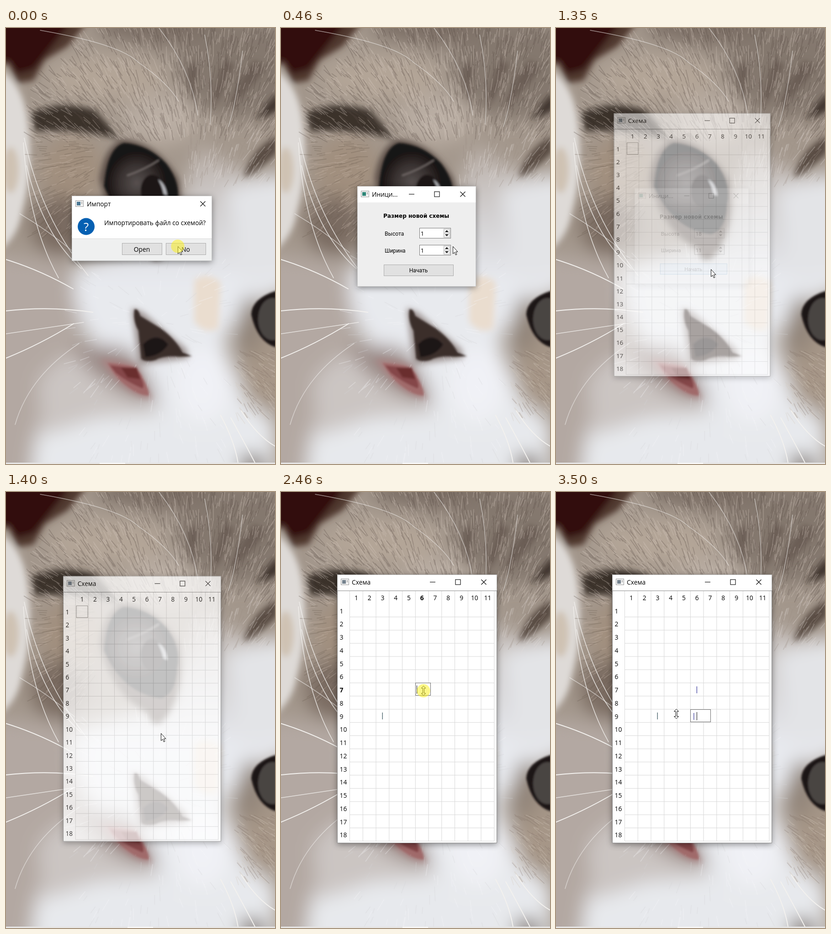
An HTML page for the animation above (3650 ms loop, 589 by 951 pixels).

```html
<!DOCTYPE html>
<html lang="ru">
<head>
<meta charset="utf-8">
<title>Схема</title>
<style>
html, body { margin: 0; width: 100%; height: 100%; overflow: hidden; background: #a79b91; }
svg { position: absolute; left: 0; top: 0; width: 589px; height: 951px; }
#photo { will-change: transform; }
text { font: 13.8px "Open Sans", "Noto Sans", sans-serif; fill: #000; white-space: pre; }
.small { font: 12.1px "Roboto", "Noto Sans", sans-serif; }
.head { font: bold 12.1px "DejaVu Sans", sans-serif; }
.mid { text-anchor: middle; }
.bar { font-size: 15px; text-anchor: middle; }
.btn { fill: #e1e1e1; stroke: #adadad; }
.line { fill: none; stroke: #111; stroke-width: 1.15; }
.shade { filter: drop-shadow(0 3px 7px rgba(0, 0, 0, .42)); }
</style>
</head>
<body>
<svg id="photo" viewBox="0 0 589 951">
  <defs>
    <filter id="b20" x="-40%" y="-40%" width="180%" height="180%"><feGaussianBlur stdDeviation="20"/></filter>
    <filter id="b7" x="-40%" y="-40%" width="180%" height="180%"><feGaussianBlur stdDeviation="7"/></filter>
    <filter id="b2" x="-30%" y="-30%" width="160%" height="160%"><feGaussianBlur stdDeviation="2"/></filter>
    <filter id="b05" x="0" y="0" width="100%" height="100%"><feGaussianBlur stdDeviation=".6"/></filter>
    <radialGradient id="iris"><stop offset="0" stop-color="#57504f"/><stop offset=".6" stop-color="#37302f"/><stop offset="1" stop-color="#1b1514"/></radialGradient>
    <linearGradient id="muzzle" x2="0" y2="1"><stop offset="0" stop-color="#b9aea6"/><stop offset=".22" stop-color="#d3d1d2"/><stop offset=".4" stop-color="#e8eaef"/><stop offset="1" stop-color="#e7e9ec"/></linearGradient>
  </defs>
  <rect width="589" height="951" fill="#a3978c"/>
  <g filter="url(#b20)">
    <ellipse cx="220" cy="110" rx="130" ry="50" fill="#b3a597"/>
    <ellipse cx="350" cy="-10" rx="150" ry="50" fill="#7d7066"/>
    <ellipse cx="520" cy="90" rx="140" ry="110" fill="#84786e"/>
    <ellipse cx="340" cy="200" rx="80" ry="55" fill="#b9ada3"/>
    <ellipse cx="145" cy="310" rx="70" ry="75" fill="#a18f7e"/>
    <ellipse cx="115" cy="430" rx="60" ry="65" fill="#796a60"/>
    <path d="M-60 490L130 510 170 620 160 700 60 1010H-60Z" fill="#b3a8a2"/>
    <path d="M150 520Q260 480 360 470Q390 330 430 250Q500 340 660 310V560Q520 590 480 680Q500 790 590 860V1010H60Q40 840 190 690Q140 610 150 520Z" fill="url(#muzzle)"/>
    <path d="M480 350L640 310V540L520 560Z" fill="#e3e4e7"/>
    <path d="M70 770Q120 700 220 690Q260 790 350 840L200 850 80 890Z" fill="#cbc5c2"/>
    <path d="M140 700Q240 680 285 715L335 815Q240 815 140 700Z" fill="#988783"/>
    <ellipse cx="565" cy="750" rx="55" ry="85" fill="#a69687"/>
    <ellipse cx="535" cy="650" rx="25" ry="65" fill="#8f8277"/>
    <ellipse cx="540" cy="955" rx="30" ry="26" fill="#75665f"/>
    <ellipse cx="430" cy="780" rx="60" ry="80" fill="#f4f6f9" opacity=".7"/>
  </g>
  <g filter="url(#b7)">
    <path d="M-40-40H200L135 40 85 70 60 115 25 120 5 75 -40 100Z" fill="#4f372e"/>
    <path d="M-40-40H165L100 40 60 90 25 100 5 70 -40 80Z" fill="#330d07"/>
    <path d="M-20 85Q40 120 48 210Q62 300 35 400Q25 460-20 490Z" fill="#dedad7"/>
    <ellipse cx="10" cy="310" rx="18" ry="50" fill="#cfc2b3"/>
    <path d="M55 185Q120 155 195 180L250 242Q160 220 65 225Z" fill="#3b302b"/>
    <path d="M595 235Q540 260 520 325Q545 320 595 270Z" fill="#594b43"/>
    <path d="M600 140Q570 160 550 200Q580 190 600 175Z" fill="#3f352f"/>
    <path d="M480 70Q455 120 450 180Q480 130 500 80ZM545 70Q505 110 490 180Q530 130 570 90ZM400 80Q395 120 415 160Q420 110 415 70Z" fill="#6a5d54"/>
    <path d="M205 330Q215 260 255 243Q330 248 378 330Q394 420 355 485Q325 530 308 480Q230 440 205 330Z" fill="#584c45"/>
    <path d="M412 550Q440 530 470 555L465 655Q435 670 412 640Z" fill="#eaddcf"/>
    <path d="M275 610L300 620 395 700 400 720 290 735Z" fill="#9c9290"/>
    <path d="M205 722Q250 722 285 735L320 810Q260 805 205 722Z" fill="#a88584"/>
  </g>
  <g id="fur" fill="none" stroke-width="1.7" stroke-linecap="round" filter="url(#b05)"></g>
  <g filter="url(#b2)">
    <path d="M215 345Q222 262 258 251Q310 254 350 295Q385 340 374 385Q372 440 340 450Q255 440 215 345Z" fill="#191413"/>
    <ellipse cx="286" cy="338" rx="64" ry="68" fill="url(#iris)"/>
    <ellipse cx="320" cy="355" rx="25" ry="35" fill="#1b1514"/>
    <path d="M265 322Q305 308 335 288" fill="none" stroke="#7a7270" stroke-width="2.5"/>
    <path d="M333 330Q350 340 353 366L345 362Q342 345 333 330Z" fill="#b4b5ba"/>
    <path d="M592 573Q538 590 537 625Q550 685 592 697Z" fill="#1e1817"/>
    <ellipse cx="584" cy="635" rx="32" ry="46" fill="#4a4443"/>
    <path d="M281 614Q289 610 294 628Q322 645 340 656Q372 680 387 708Q400 713 407 716L380 717Q345 714 328 724Q308 730 296 722Q293 690 290 660Q278 640 281 614Z" fill="#3a2d2b"/>
    <path d="M300 690Q330 660 355 690Q340 715 305 718Z" fill="#1f1716"/>
    <path d="M222 730Q245 732 268 736Q290 740 300 765Q314 790 312 802Q290 800 270 785Q240 765 222 730Z" fill="#a06a6b"/>
    <path d="M228 736Q260 740 286 741L298 768Q304 785 298 786Q265 772 240 752Z" fill="#854649"/>
    <path d="M252 741H286L294 766 266 762Z" fill="#6b2d2f"/>
  </g>
  <g fill="none" stroke="#f3f1ee" stroke-linecap="round">
    <path stroke-width="2" d="M0 505Q75 528 147 569M0 617Q95 606 190 620M0 720Q75 690 148 645"/>
    <path stroke-width="1.6" opacity=".8" d="M0 667Q80 655 170 642M40 240Q75 410 180 540M45 300Q80 450 165 525M38 250Q50 430 115 545"/>
    <path stroke-width="1.5" opacity=".55" d="M20 865Q50 760 160 688M30 405Q90 440 150 490M75 5Q250 35 290 75Q355 120 378 160M335 0Q405 90 420 190M435 15Q455 110 447 210M518 50Q505 160 487 215"/>
    <path stroke-width="2" d="M470 845Q500 900 508 948M492 850Q520 900 545 948M515 835Q550 890 589 912"/>
  </g>
  <rect y="948" width="589" height="3" fill="#e6e5e5"/>
</svg>

<svg id="ui" viewBox="0 0 589 951"></svg>

<script>
const LOOP = 3650;
const TICKS = [0, 90, 160, 230, 300, 380, 460, 540, 630, 770, 840, 920, 990, 1070, 1140, 1230,
  1350, 1400, 1470, 1540, 1770, 1840, 1920, 2000, 2080, 2150, 2230, 2310, 2460, 2540, 2610,
  2690, 2760, 2840, 3010, 3160, 3240, 3410, 3500];
// time, x, y of the pointer
const PATH = [[0, 376, 476], [460, 376, 476], [540, 369, 488], [630, 361, 497], [840, 352, 508],
  [1070, 339, 526], [1540, 339, 526], [1770, 234.5, 493], [1840, 222, 489], [2000, 222, 489],
  [2230, 312, 433.5], [2610, 312, 433.5], [2840, 311, 488], [3160, 311, 488], [3240, 296, 488],
  [3410, 276, 486], [3500, 263.5, 484]];
const CLICKS = [[0, 160], [1140, 1230], [1840, 2000], [2310, 2540], [3010, 3160]];
// cell editors: column, row, opened, typed, closed
const EDITS = [
  { c: 3, r: 9, open: 1920, typed: 2000, close: 2460, ink: '#10323c' },
  { c: 6, r: 7, open: 2460, typed: 2610, close: 3010, ink: '#1a1a8a' },
  { c: 6, r: 9, open: 3010, typed: 3160, close: LOOP, ink: '#1a1a8a' }
];
// fur patches: strokes in a box, combed away from a point
const FUR = [
  { n: 1300, box: [60, 0, 529, 250], from: [430, 430], tones: ['#d6cbc0', '#5a4e46'] },
  { n: 200, box: [65, 230, 130, 220], from: [330, 250], tones: ['#c9bbab', '#6b5c50'] },
  { n: 130, box: [390, 230, 190, 120], from: [400, 520], tones: ['#e4dfda', '#9b8f86'] },
  { n: 120, box: [500, 700, 89, 140], from: [400, 640], tones: ['#d5cabd', '#85766a'] },
  { n: 180, box: [150, 500, 330, 440], from: [330, 640], tones: ['#f8f9fb', '#d3d3d6'] }
];
const COLS = 11, ROWS = 18, STEP = 28.76;
const colX = c => 150.5 + STEP * (c - 1);
const rowY = r => 243.8 + STEP * (r - 1);
const range = n => Array.from({ length: n }, (_, i) => i + 1);
const clamp = v => Math.max(0, Math.min(1, v));
const $ = id => document.getElementById(id);
const set = (id, attrs) => { for (const k in attrs) $(id).setAttribute(k, attrs[k]); };
const show = (id, on) => $(id).setAttribute('visibility', on ? 'inherit' : 'hidden');

const text = (x, y, s, cls = '', id = '') => `<text x="${x}" y="${y}" class="${cls}" id="${id}">${s}</text>`;
const rect = (x, y, w, h, rest) => `<rect x="${x}" y="${y}" width="${w}" height="${h}" ${rest}/>`;
const cross = (x, y) => `<path class="line" d="M${x - 5.5} ${y - 5.5}l11 11m0-11l-11 11"/>`;
const icon = (x, y, color) => rect(x + .5, y + .5, 17, 13, 'fill="#f3f3f3" stroke="#9b9b9b"') +
  rect(x + 3, y + 3, 8, 8, `fill="${color}"`) + rect(x + 13, y + 3, 2, 5, 'fill="#b5b5b5"');
const controls = (x, y) => `<path class="line" d="M${x - 118} ${y}h12"/>` +
  rect(x - 62, y - 5.5, 11, 11, 'class="line"') + cross(x, y);

function spin(y, id) {
  return rect(303.5, y + .5, 68, 22, `fill="#fff" stroke="#7a7a7a" id="${id}Box"`) +
    text(306, y + 17, '1', 'small', id) +
    rect(356.5, y + 2.5, 13, 9, 'fill="#f0f0f0" stroke="#b4b4b4"') +
    rect(356.5, y + 11.5, 13, 9, 'fill="#f0f0f0" stroke="#b4b4b4"') +
    `<path d="M359 ${y + 9}l4-4 4 4zM359 ${y + 14}l4 4 4-4z" fill="#111"/>`;
}

const importBox = rect(144, 366, 307, 142, 'fill="#fff" class="shade"') +
  rect(144, 459, 307, 49, 'fill="#eff0f0"') + rect(144, 459, 307, 1, 'fill="#dcdcdc"') +
  rect(144.5, 366.5, 306, 141, 'fill="none" stroke="#8a8a8a" stroke-opacity=".35"') +
  icon(152, 376, '#4b7894') + text(177, 389, 'Импорт') + cross(431, 383.5) +
  '<circle cx="175.5" cy="433" r="18.5" fill="#0560b2"/>' +
  '<text x="175.5" y="442.5" class="mid" style="font-size:26px;fill:#fff">?</text>' +
  text(215, 430, 'Импортировать файл со схемой?') +
  rect(254.5, 469.5, 87, 25, 'class="btn"') + text(297.5, 488, 'Open', 'mid') +
  rect(350.5, 469.5, 87, 25, 'class="btn"') + text(393.5, 488, 'No', 'mid');

const sizeBox = rect(167, 345, 260, 219, 'fill="#eee" class="shade"') +
  rect(167, 345, 260, 35.5, 'fill="#fff"') +
  rect(167.5, 345.5, 259, 218, 'fill="none" stroke="#8a8a8a" stroke-opacity=".35"') +
  icon(175, 355, '#2f8678') + text(199, 368, 'Иници...') + controls(398, 362.5) +
  text(224, 414, 'Размер новой схемы', 'head') +
  text(227, 453, 'Высота', 'small') + spin(436, 'high') +
  text(227, 490, 'Ширина', 'small') + spin(473, 'wide') +
  rect(225.5, 516.5, 152, 24, 'class="btn" id="start"') + text(301, 533, 'Начать', 'small mid');

const lines = range(COLS + 1).map(c => `M${colX(c)} 216V762`).join('') +
  range(ROWS).map(r => `M150.5 ${rowY(r + 1)}H467`).join('');
const gridBox = rect(123, 180, 350, 586, 'fill="#fff" class="shade"') +
  rect(123.5, 180.5, 349, 585, 'fill="none" stroke="#8c8c8c" stroke-opacity=".6"') +
  '<path d="M123 215.5H473M123.5 215V765.5H472.5V215" fill="none" stroke="#8c8c8c"/>' +
  icon(131, 189, '#76838f') + text(155, 202, 'Схема') + controls(444, 196.5) +
  `<path d="${lines}" fill="none" stroke="#d8d8d8"/>` +
  range(COLS).map(c => text(colX(c) + 14.5, 236, c, 'mid', 'col' + c)).join('') +
  range(ROWS).map(r => text(128.5, rowY(r) + 20.7, r, '', 'row' + r)).join('') +
  rect(152.5, 245.5, 25, 26, 'fill="none" stroke="#222" stroke-dasharray="1 1" id="focus"') +
  EDITS.map((e, i) => `<text class="bar" x="${colX(e.c) + 14}" y="${rowY(e.r) + 18.5}" style="fill:${e.ink}" id="mark${i}">|</text>`).join('') +
  '<g id="editor">' + rect(.5, .5, 33, 27, 'fill="#fff" stroke="#6c6c6c" id="frame"') +
  text(8, 18.5, '|', 'bar', 'typed') + '<path d="M0 6V24" stroke="#111" id="caret"/></g>';

$('ui').innerHTML = rect(205, 948.5, 56, 2.5, 'fill="#fafafa" id="tab"') +
  `<g id="grid">${gridBox}</g><g id="size">${sizeBox}</g><g id="import">${importBox}</g>` +
  '<g id="pointer" fill="#fff" stroke="#111" stroke-linejoin="round">' +
  '<path id="arrow" d="M.5.5V16.5L4 13.2 6.5 19 9 17.9 6.5 12.2H11Z"/>' +
  '<path id="resize" d="M0-10.5L5-5.5H1.5V5.5H5L0 10.5-5 5.5H-1.5V-5.5H-5Z"/>' +
  '<circle id="click" r="14.6" fill="#fbf022" fill-opacity=".54" stroke="none"/></g>';

function growFur() {
  let seed = 7;
  const rnd = () => (seed = seed * 16807 % 2147483647) / 2147483647;
  const strokes = ({ n, box: [left, top, w, h], from, tones }) => {
    const paths = tones.map(() => '');
    for (let i = 0; i < n; i++) {
      const x = left + rnd() * w, y = top + rnd() * h, size = 10 + rnd() * 22;
      const a = Math.atan2(y - from[1], x - from[0]) + (rnd() - .5) * .4;
      if (x + y < 210) continue;
      paths[i % tones.length] += `M${x.toFixed(1)} ${y.toFixed(1)}l` +
        `${(Math.cos(a) * size).toFixed(1)} ${(Math.sin(a) * size).toFixed(1)}`;
    }
    return paths.map((d, i) => `<path d="${d}" stroke="${tones[i]}" opacity=".3"/>`).join('');
  };
  $('fur').innerHTML = FUR.map(strokes).join('');
}

function pointerAt(t) {
  const i = PATH.findIndex(p => p[0] > t);
  if (i < 0) return PATH[PATH.length - 1].slice(1);
  const [t0, x0, y0] = PATH[i - 1], [t1, x1, y1] = PATH[i];
  const k = (t - t0) / (t1 - t0);
  return [x0 + (x1 - x0) * k, y0 + (y1 - y0) * k];
}

function fade(id, alpha, shrink, cx, cy) {
  const s = 1 - shrink * (1 - alpha);
  show(id, alpha > 0);
  set(id, { opacity: alpha, transform: `translate(${cx} ${cy}) scale(${s}) translate(${-cx} ${-cy})` });
}

function draw(t) {
  fade('import', clamp(1 - (t - 110) / 150), .06, 297.5, 437);
  fade('size', t < 1200 ? clamp((t - 200) / 160) : clamp(1 - (t - 1200) / 176), .045, 297, 455);
  fade('grid', clamp((t - 1200) / 270), .045, 298, 473);
  set('tab', { x: t < 460 ? 205 : 266 });

  $('high').textContent = t < 630 ? '1' : '18';
  $('wide').textContent = t < 920 ? '1' : '11';
  set('highBox', { stroke: t >= 540 && t < 770 ? '#222' : '#7a7a7a' });
  set('wideBox', { stroke: t >= 770 ? '#222' : '#7a7a7a' });
  const hot = t >= 1070, down = t >= 1140;
  $('start').style.fill = down ? '#cce1f2' : hot ? '#e5f1fb' : '';
  $('start').style.stroke = down ? '#25689f' : hot ? '#0078d7' : '';

  const edit = EDITS.find(e => t >= e.open && t < e.close);
  const fresh = edit && t < edit.typed;
  show('focus', t < EDITS[0].open);
  EDITS.forEach((e, i) => show('mark' + i, t >= e.close));
  for (const c of range(COLS)) $('col' + c).style.fontWeight = fresh && edit.c === c ? 'bold' : '';
  for (const r of range(ROWS)) $('row' + r).style.fontWeight = fresh && edit.r === r ? 'bold' : '';
  show('editor', edit);
  if (edit) {
    set('editor', { transform: `translate(${Math.round(colX(edit.c))} ${Math.round(rowY(edit.r))})` });
    set('frame', { width: fresh ? 33 : 44 });
    set('caret', { transform: `translate(${fresh ? 3.5 : 14.5} 0)` });
    show('typed', !fresh);
    $('typed').style.fill = edit.ink;
  }

  const [x, y] = pointerAt(t);
  set('pointer', { transform: `translate(${x} ${y})` });
  show('arrow', t < 1770);
  show('resize', t >= 1770);
  show('click', CLICKS.some(([a, b]) => t >= a && t < b));
}

growFur();
const began = performance.now();
let last = -1;
function frame() {
  const now = (performance.now() - began) % LOOP;
  const tick = TICKS.filter(v => v <= now).pop() || 0;
  if (tick !== last) draw(last = tick);
  requestAnimationFrame(frame);
}
frame();
</script>
</body>
</html>
```
